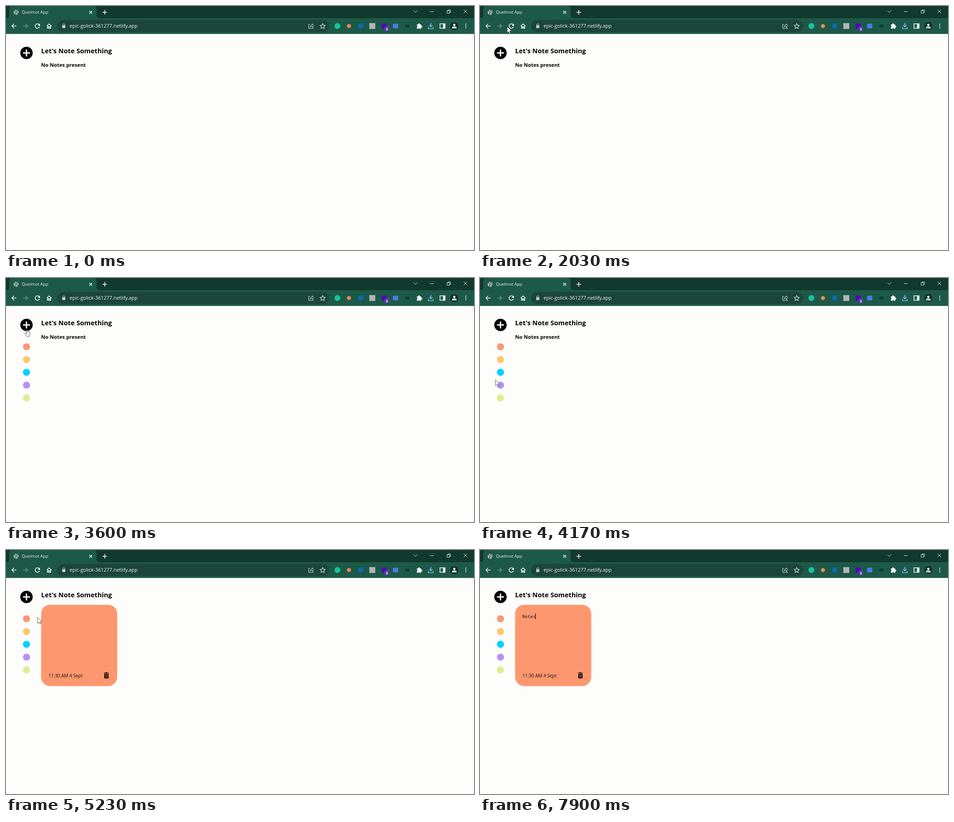
Write an HTML page that moves like this. It is 1033x542 px and loops after 8 s.

```html
<!DOCTYPE html>
<html lang="en">
<head>
<meta charset="utf-8">
<title>Notes</title>
<style>
  html, body { margin: 0; width: 100%; height: 100%; overflow: hidden; background: #fdfdfc; }
  svg { display: block; width: 100vw; height: 100vh; }
  text { font-family: "Open Sans", "Noto Sans", sans-serif; }
  .bold { font-weight: 700; }
  #typed { font-family: "Noto Sans Mono", "DejaVu Sans Mono", monospace; }
  .line { fill: none; stroke: #fff; stroke-width: 1.5; }
  .thin { fill: none; stroke: #dbe5e1; stroke-width: 1; }
</style>
</head>
<body>
<svg viewBox="0 0 1033 542">
  <rect width="1033" height="542" fill="#fdfdfc"/>

  <!-- Tab strip -->
  <rect width="1033" height="28" fill="#12392e"/>
  <path d="M0 27Q7 27 7 20V7Q7 0 14 0H193Q200 0 200 7V20Q200 27 207 27H1033V62H0Z" fill="#1d5949"/>
  <path d="M0 61.8H1033" stroke="#4d796d" stroke-width=".8"/>
  <circle cx="22.5" cy="14" r="5.7" fill="#a9b8b3"/>
  <path d="M18 11l4 1 1 2-2 2v3M23 9l1 2 3 1M24 15l3 1-1 2" fill="none" stroke="#1d5949" stroke-width="1.2"/>
  <text x="35" y="17.3" font-size="9.4" fill="#eef4f1">Quelmot App</text>
  <path class="line" d="M184 11l6 6m0-6l-6 6M213 14h10m-5-5v10"/>
  <path class="thin" d="M899 10l4.5 4.5 4.5-4.5M936 12.5h8M1010 8l8 8m0-8l-8 8"/>
  <path class="thin" d="M973.5 10.5h5.5v5.500h-5.500zM975.500 10.500v-2h5.500v6h-2"/>

  <!-- Toolbar -->
  <rect x="113" y="31" width="600" height="27" rx="13.5" fill="#1b4639"/>
  <path class="line" d="M23 44.500H13m5-5l-5 5 5 5"/>
  <path class="line" d="M38 44.500h10m-5-5l5 5-5 5" style="stroke:#719488"/>
  <path class="line" d="M73.200 41.300A5 5 0 1 0 74 46"/>
  <path d="M75 39v5h-5z" fill="#fff"/>
  <path class="line" d="M90 44.500l5.200-4.700 5.200 4.700M91.700 44v5.500h2.200v-3.500h2.600v3.500h2.200v-5.500"/>
  <rect x="124" y="43" width="7" height="6" rx=".8" fill="#c3d0cb"/>
  <path d="M125.500 43v-1.500a2 2 0 0 1 4 0V43" fill="none" stroke="#c3d0cb" stroke-width="1.200"/>
  <text x="140.300" y="48.300" font-size="10.900" fill="#f3f7f5">epic-golick-361277.netlify.app</text>
  <path class="thin" d="M671 41h-3v9h10v-3M671 47q0-5 5-5v-2.500l3.500 4-3.500 4V45q-3 0-5 2z"/>
  <path class="thin" d="M699 39l1.700 3.700 4 .5-3 2.700.800 4-3.500-2-3.500 2 .800-4-3-2.700 4-.5z" style="stroke-width:1.200"/>

  <!-- Extensions -->
  <circle cx="731.500" cy="44.500" r="6.500" fill="#15c39a"/>
  <circle cx="757" cy="44.500" r="4.500" fill="#e58a55"/>
  <circle cx="783" cy="44.500" r="6" fill="#0b68b4"/>
  <rect x="802" y="38" width="13" height="13" fill="#b3b3b1"/>
  <rect x="829" y="39" width="11" height="11" fill="#4a10ae"/>
  <rect x="835.500" y="46" width="10" height="10" rx="2" fill="#6739b1"/>
  <text x="838.400" y="53.700" font-size="7.500" fill="#fff" class="bold">3</text>
  <rect x="854" y="39.500" width="12" height="10" rx="1.500" fill="#4a7de0"/>
  <rect x="881.500" y="41.500" width="9" height="6" fill="#173a30"/>
  <path d="M907 41h3a1.800 1.800 0 1 1 3.500 0h3v3a1.800 1.800 0 1 1 0 3.500v3h-3.200a1.700 1.700 0 0 0-3.200 0H907v-3.200a1.700 1.700 0 0 0 0-3.200z" fill="#fff"/>
  <path d="M937.700 38v8m-3.700-3.500l3.700 3.700 3.700-3.700M932.500 46.500v4h10.500v-4" fill="none" stroke="#8ab8f5" stroke-width="1.700"/>
  <path d="M958 39.500h11v10h-11zM965.500 39.500v10h3.500v-10z" fill="none" stroke="#fff" stroke-width="1.500"/>
  <path d="M965 39h4.500v11H965z" fill="#fff"/>
  <circle cx="989.500" cy="44.500" r="9" fill="#12352b"/>
  <circle cx="989.500" cy="42" r="2.500" fill="#fff"/>
  <path d="M984.500 49.500v-1q0-3 5-3t5 3v1z" fill="#fff"/>
  <path d="M1015 40.500v.01M1015 44.500v.01M1015 48.500v.01" stroke="#fff" stroke-width="2.300" stroke-linecap="round"/>

  <!-- Page -->
  <circle cx="45.200" cy="104.200" r="13.700"/>
  <path d="M45.200 97.700v13M38.700 104.200h13" stroke="#fff" stroke-width="3" stroke-linecap="round"/>
  <text x="77.500" y="105" font-size="14.650" class="bold">Let's Note Something</text>
  <text id="empty" x="77.500" y="134.500" font-size="11.300" class="bold">No Notes present</text>
  <g id="swatches"></g>

  <g id="card">
    <rect x="77.500" y="121.700" width="168" height="180.500" rx="20" fill="#fd976f"/>
    <text id="typed" x="93.600" y="151" font-size="9.600" fill="#1c100b"></text>
    <path id="caret" d="M0 141v12.500" stroke="#000" stroke-width="1.200"/>
    <text x="93.800" y="283" font-size="10" fill="#1c100b">11:30 AM 4 Sept</text>
    <path d="M216.300 272.700h3.200l.7-1h2.600l.7 1h3.200v1.500h-10.400zM217 275.500h9.200v8.300q0 1.500-1.500 1.500h-6.200q-1.500 0-1.500-1.500z"/>
    <path d="M220 277v6.500M223.200 277v6.500" stroke="#fd976f" stroke-width="1.200"/>
  </g>

  <!-- Pointers, tip at 0,0 -->
  <path id="arrow" d="M0 0V13.500L3.200 10.700 5.200 15.300 7.300 14.400 5.300 9.800H9.700Z" fill="#fff" stroke="#333" stroke-width=".8"/>
  <path id="hand" d="M-1.200 6.500V1.200q0-1.200 1.100-1.200t1.100 1.200V5q1.400-.8 2 .4 1.400-.6 1.900.5 1.500-.3 1.500 1.200v3.400L5 14.500H-.7L-4.300 9.600q-.8-1.300.3-1.800 1-.3 2.800 1.600z" fill="#fff" stroke="#222" stroke-width=".8"/>
  <path id="beam" d="M-2.500-8H-.7L0-7.300.7-8H2.500M0-7.300V7.300M-2.500 8H-.7L0 7.300.7 8H2.500" fill="none" stroke="#000" stroke-width=".8"/>
</svg>
<script>
const LOOP = 8000;
const $ = id => document.getElementById(id);
const show = (node, on) => node.setAttribute("visibility", on ? "inherit" : "hidden");

// time, x, y of the pointer tip
const path = [
  [670, 1008, 300], [1100, 810, 480], [1470, 580, 480], [1800, 210, 220],
  [2030, 60, 46], [2300, 74, 42], [2500, 52, 110], [2670, 48, 104],
  [3500, 48, 104], [3830, 43, 140], [4170, 34, 226], [4400, 38, 212],
  [4670, 43, 164], [4930, 43, 153], [5070, 43, 153], [5370, 93, 146.500]
];
// start time, pointer shape
const shapes = [[0, ""], [670, "arrow"], [2450, "hand"], [3700, "arrow"], [5270, "beam"], [6130, ""]];
// start time, typed text
const typing = [[0, ""], [6800, "N"], [6970, "No"], [7300, "Not"], [7630, "Note"], [7830, "Notes"]];

const latest = (steps, t) => steps.filter(step => step[0] <= t).pop()[1];

const swatches = ["#fa9871", "#fec56e", "#00d0fe", "#b490f6", "#e3ec8d"].map(color => {
  const dot = document.createElementNS("http://www.w3.org/2000/svg", "ellipse");
  dot.setAttribute("cx", 45.2);
  dot.setAttribute("rx", 7.8);
  dot.setAttribute("fill", color);
  return $("swatches").appendChild(dot);
});

function pointerAt(t) {
  const next = path.findIndex(point => point[0] > t);
  if (next < 0) return path[path.length - 1].slice(1);
  if (next === 0) return path[0].slice(1);
  const [t0, x0, y0] = path[next - 1], [t1, x1, y1] = path[next];
  const k = (t - t0) / (t1 - t0);
  return [x0 + (x1 - x0) * k, y0 + (y1 - y0) * k];
}

function draw(t) {
  show($("swatches"), t >= 3030);
  const k = Math.min(1, Math.max(0, (t - 3030) / 350));
  const size = 3.2 + 12.4 * (1 - (1 - k) ** 2);
  swatches.forEach((dot, i) => {
    dot.setAttribute("cy", 145 + size / 2 + i * (size + 12.8));
    dot.setAttribute("ry", size / 2);
  });

  show($("empty"), t < 5070);
  show($("card"), t >= 5070);
  const text = latest(typing, t);
  $("typed").textContent = text;
  show($("caret"), t >= 6700 || (t >= 5630 && t < 6130));
  $("caret").setAttribute("transform", `translate(${93.7 + text.length * 5.76})`);

  const shape = latest(shapes, t);
  const [x, y] = pointerAt(t);
  for (const id of ["arrow", "hand", "beam"]) {
    show($(id), id === shape);
    $(id).setAttribute("transform", `translate(${x} ${y})`);
  }
}

const start = performance.now();
function tick() {
  draw((performance.now() - start) % LOOP);
  requestAnimationFrame(tick);
}
tick();
</script>
</body>
</html>
```
